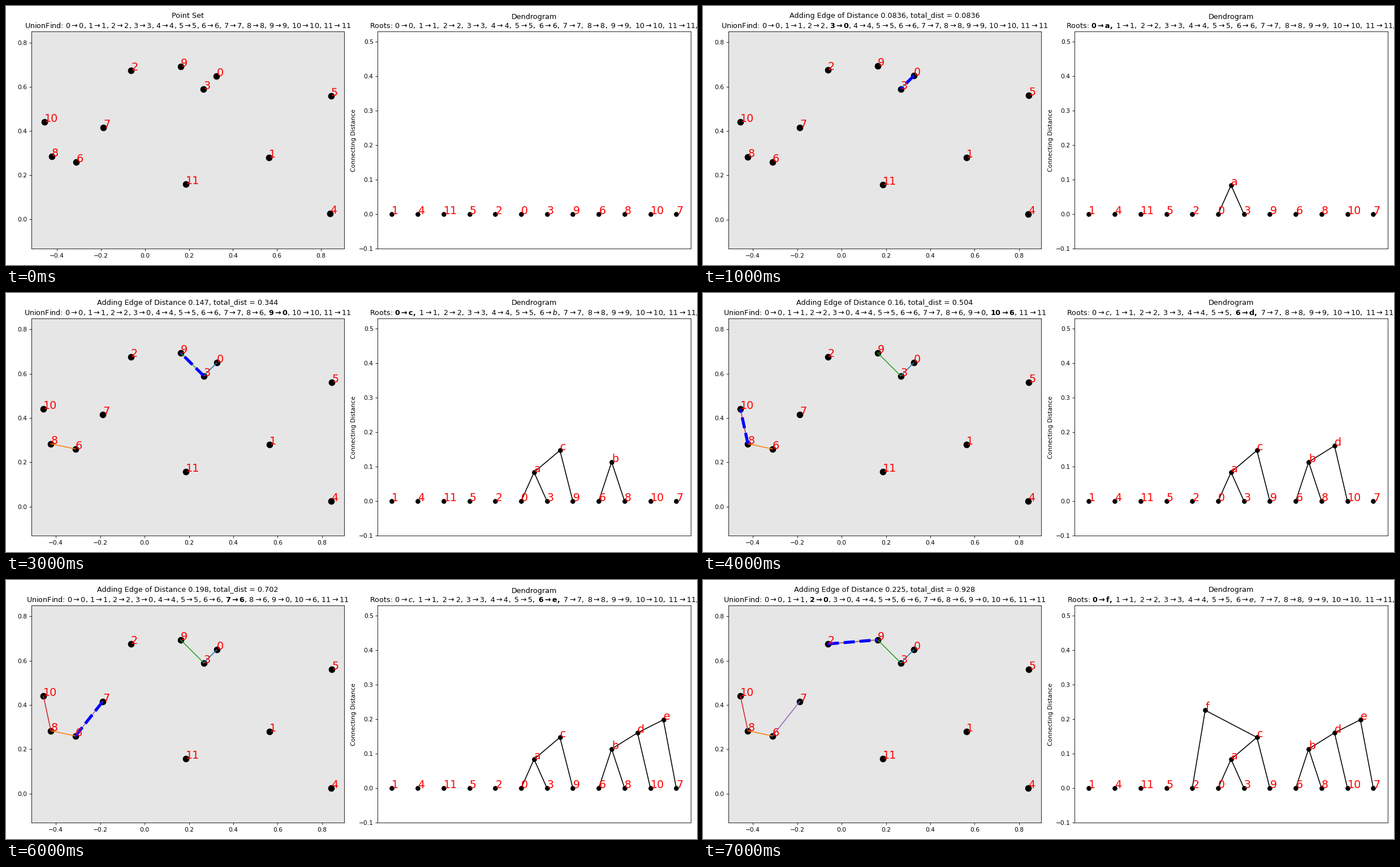
Write a matplotlib script that moves like this. It is 1222 px wide and 458 px high and loops after 8000 ms.

```python
from itertools import combinations
from math import dist

import matplotlib.pyplot as plt
from matplotlib.animation import FuncAnimation

W, H = 1222, 458
DPI = W / 16
STEPS = 7

POINTS = [(0.3258, 0.6490), (0.5626, 0.2800), (-0.0622, 0.6753), (0.2666, 0.5900),
          (0.8410, 0.0242), (0.8448, 0.5601), (-0.3117, 0.2602), (-0.1890, 0.4155),
          (-0.4226, 0.2837), (0.1625, 0.6938), (-0.4564, 0.4403), (0.1853, 0.1577)]
COUNT = len(POINTS)


def kruskal():
    """List every edge by length with the merge it causes, plus the leaf order."""
    root = list(range(COUNT))
    top = list(range(COUNT))          # current tree node of each root
    leaves = {i: [i] for i in root}   # leaves under each root, left to right
    steps, total = [], 0
    edges = combinations(range(COUNT), 2)
    for i, j in sorted(edges, key=lambda e: dist(POINTS[e[0]], POINTS[e[1]])):
        length = dist(POINTS[i], POINTS[j])
        a, b = root[i], root[j]
        merge = None
        if a != b:
            total += length
            keep, drop = min(a, b), max(a, b)
            name = chr(ord("a") + sum(s["merge"] is not None for s in steps))
            merge = dict(keep=keep, drop=drop, name=name, children=(top[a], top[b]),
                         between=(leaves[a][-1], leaves[b][0]))
            leaves[keep] = leaves[a] + leaves[b]
            top[keep] = name
            root = [keep if r == drop else r for r in root]
        steps.append(dict(edge=(i, j), length=length, total=total, merge=merge))
    return steps, leaves[0]


ALL_STEPS, ORDER = kruskal()
TALLEST = max(s["length"] for s in ALL_STEPS if s["merge"])

fig, (left, right) = plt.subplots(1, 2, figsize=(W / DPI, H / DPI), dpi=DPI)


def label(ax, spot, text):
    ax.text(*spot, str(text), color="red", fontsize=18)


def arrow(a, b, bold, tail=""):
    body = rf"{a}\rightarrow {b}{tail}"
    return rf"$\mathbf{{{body}}}$" if bold else f"${body}$"


def plot_edge(edge, *args, **style):
    left.plot(*zip(*(POINTS[i] for i in edge)), *args, **style)


def frame_points(half):
    x_mid, y_mid = (0.1947, 0.3588)
    tall = half * left.bbox.height / left.bbox.width
    left.set_xlim(x_mid - half, x_mid + half)
    left.set_ylim(y_mid - tall, y_mid + tall)


def draw_points(done):
    left.clear()
    left.set_facecolor("#e6e6e6")
    left.scatter(*zip(*POINTS), s=100, c="k")
    for i, spot in enumerate(POINTS):
        label(left, spot, i)

    parent = list(range(COUNT))
    for step in done:
        if step["merge"]:
            plot_edge(step["edge"])
            parent[step["merge"]["drop"]] = step["merge"]["keep"]

    title, changed = "Point Set", None
    if done:
        last = done[-1]
        merge = last["merge"]
        plot_edge(last["edge"], "b--" if merge else "r--", lw=5)
        changed = merge["drop"] if merge else None
        verb = "Adding" if merge else "Skipping"
        title = f"{verb} Edge of Distance {last['length']:.3g}, total_dist = {last['total']:.3g}"
    sets = ", ".join(arrow(i, p, i == changed) for i, p in enumerate(parent))
    left.set_title(f"{title}\nUnionFind: {sets}")
    frame_points(0.7057 if done else 0.7107)


def draw_tree(done):
    right.clear()
    nodes = {leaf: (x, 0) for x, leaf in enumerate(ORDER)}
    roots, changed = list(range(COUNT)), None
    for step in done:
        merge = step["merge"]
        if merge:
            x = sum(map(ORDER.index, merge["between"])) / 2
            nodes[merge["name"]] = spot = (x, step["length"])
            for child in merge["children"]:
                right.plot(*zip(spot, nodes[child]), "k")
            changed = merge["keep"]
            roots[changed] = merge["name"]

    right.scatter(*zip(*nodes.values()), s=50, c="k")
    for name, spot in nodes.items():
        label(right, spot, name)
    names = " ".join(arrow(i, r, i == changed, ",") for i, r in enumerate(roots))
    right.set_title(f"Dendrogram\nRoots: {names}")
    right.set_xlim(-0.55, COUNT - 0.45)
    right.set_ylim(-0.1, TALLEST + 0.1)
    right.set_xticks([])
    right.set_ylabel("Connecting Distance")


def draw(n):
    done = ALL_STEPS[:n]
    draw_points(done)
    draw_tree(done)
    return []


draw(0)
fig.tight_layout()

anim = FuncAnimation(fig, draw, frames=STEPS + 1, init_func=lambda: [],
                     interval=1000, repeat=True, repeat_delay=0)
plt.show()
```
